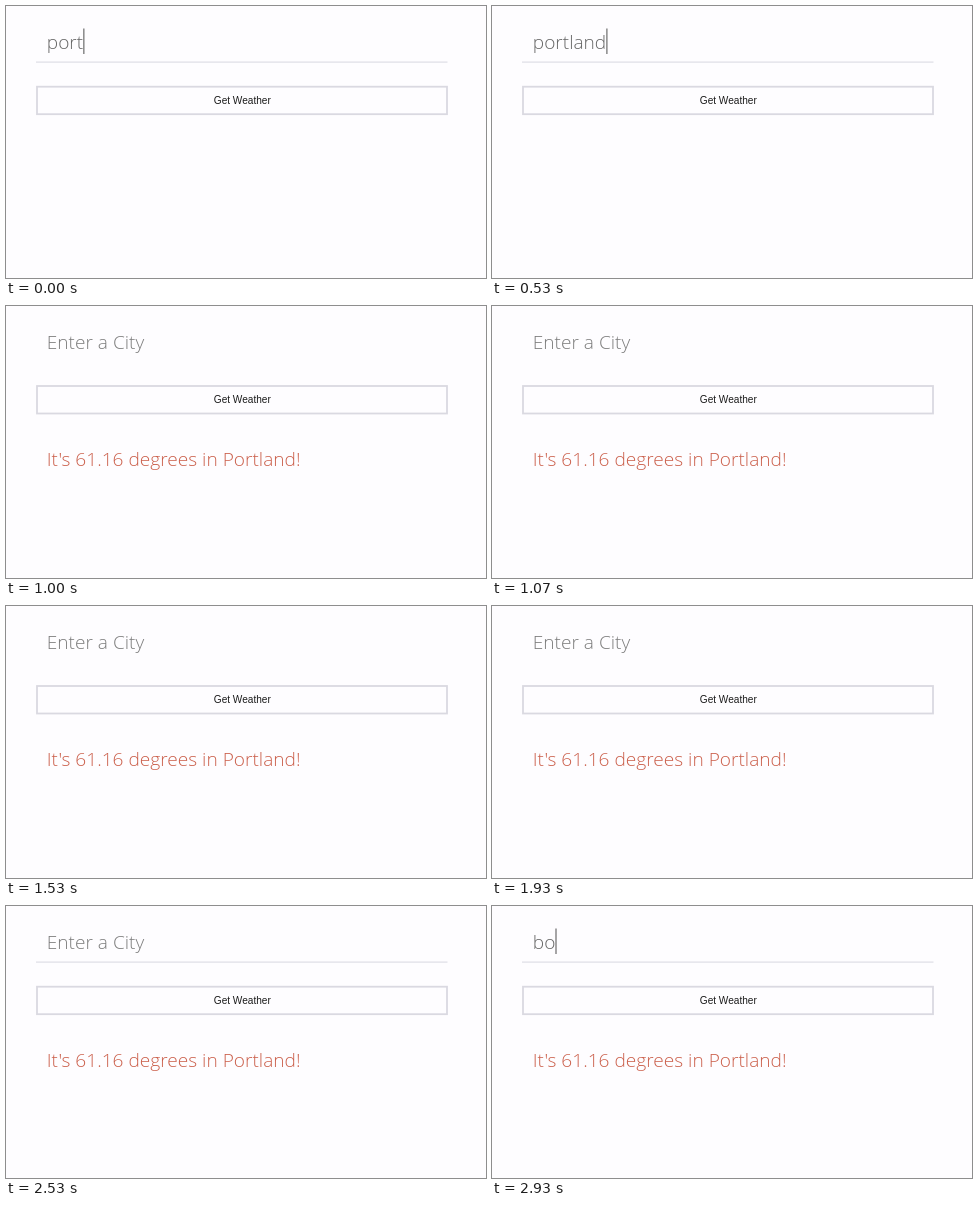
These frames come from a looping animation (480 by 272 pixels, 2.99 s). An HTML page with a canvas:

```html
<!DOCTYPE html>
<html lang="en">
<head>
<meta charset="utf-8">
<title>Weather form</title>
<style>
  html, body { margin: 0; height: 100%; overflow: hidden; background: #fefdff; }
  canvas { display: block; }
</style>
</head>
<body>
<canvas id="stage" width="480" height="272"></canvas>
<script>
const ctx = document.getElementById("stage").getContext("2d");
const LOOP = 2990, LEFT = 40.8;
const REPORT = "It's 61.16 degrees in Portland!";
const HINT = "Enter a City";
const light = size => `300 ${size}px "Open Sans", sans-serif`;

// When each letter of a word has been typed
const CITY_KEYS = [0, 0, 0, 0, 70, 200, 330, 470];
const NEXT_KEYS = [2870, 2930];
const typed = (word, keys, t) => word.slice(0, keys.filter(k => k <= t).length);

function text(str, x, y, font, color, align = "left") {
  ctx.font = font;
  ctx.fillStyle = color;
  ctx.textAlign = align;
  ctx.fillText(str, x, y);
}

function rect(x, y, w, h, color) {
  ctx.fillStyle = color;
  ctx.fillRect(x, y, w, h);
}

function buttonLabel(y) {
  text("Get Weather", 236.3, y, '10.1px "Liberation Sans", Arial, sans-serif', "#1c1c1c", "center");
}

function drawUnstyled() {
  text(HINT, 30, 3, light(10.15), "#8c8c8c");
  rect(30, 9, 412, 15.5, "#dcdcdc");
  buttonLabel(20);
  text(REPORT, 29.5, 50, light(12.25), "#4a4a4a");
}

function drawForm({ value, focused, caret, report }) {
  const font = light(19.1), shift = focused ? 0.7 : 0;
  text(value || HINT, LEFT, 43, font, value ? "#666" : "#7c7c7c");
  if (caret) rect(LEFT + ctx.measureText(value).width, 22.5, 1.3, 25.5, "#777");
  if (focused) rect(30, 55.5, 411.5, 1.2, "#dfdee6");

  ctx.lineWidth = 1.8;
  ctx.strokeStyle = "#dad9e1";
  ctx.strokeRect(31, 80 + shift, 410, 27.5);
  buttonLabel(97 + shift);
  if (report) text(REPORT, LEFT, 160.3 + shift, font, "#cb604c");
}

function draw(t) {
  rect(0, 0, 480, 272, "#fefdff");
  if (t >= 930 && t < 1000) return drawUnstyled();
  const submitted = t >= 1000;
  const focused = !submitted || t >= 2070;
  drawForm({
    value: submitted ? typed("bo", NEXT_KEYS, t) : typed("portland", CITY_KEYS, t),
    focused,
    caret: focused && !(t >= 2530 && t < 2870),
    report: submitted
  });
}

const start = performance.now();
function tick() {
  draw((performance.now() - start) % LOOP);
  requestAnimationFrame(tick);
}
tick();
</script>
</body>
</html>
```
